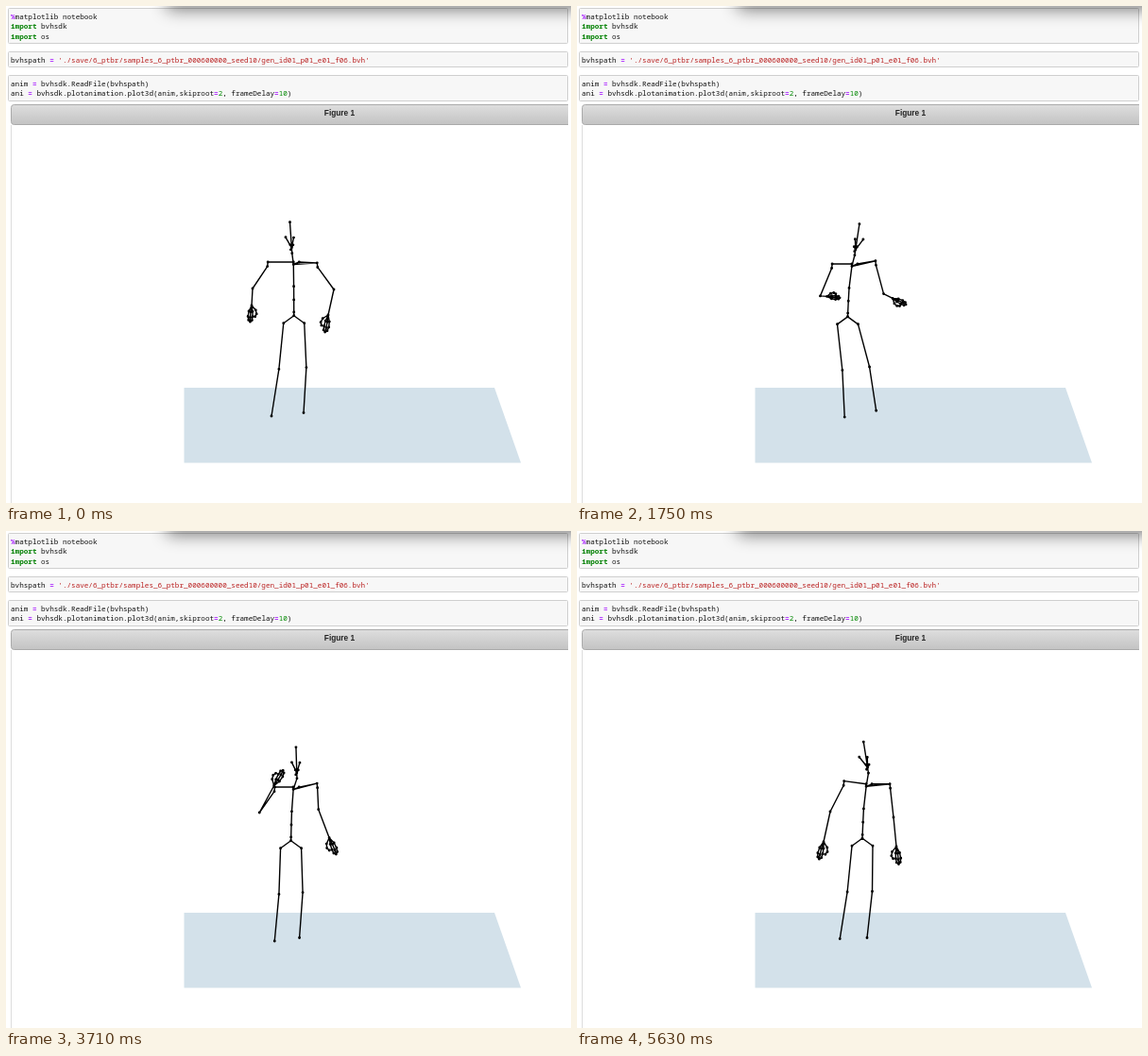
These frames come from a looping animation (598 px wide and 526 px high, 5680 ms). An HTML page:

```html
<!DOCTYPE html>
<html lang="en">
<head>
<meta charset="utf-8">
<title>Skeleton animation</title>
<style>
  html, body { margin: 0; height: 100%; overflow: hidden; background: #fff; }
  svg { display: block; width: 100vw; height: 100vh; }
  .cell { fill: #f7f7f7; stroke: #cfcfcf; }
  .code text { font: 7.63px "Noto Sans Mono", "DejaVu Sans Mono", monospace; white-space: pre; fill: #111; }
  .code .op { fill: #a2f; font-weight: bold; }
  .code .kw { fill: #008000; font-weight: bold; }
  .code .num { fill: #080; }
  .code .str { fill: #ba2121; }
  .title { font: bold 8.3px "Liberation Sans", Arial, sans-serif; fill: #222; }
  #bones, #joints { fill: none; stroke: #000; stroke-linecap: round; stroke-linejoin: round; }
  #bones { stroke-width: 1.4; }
  #joints { stroke-width: 2.9; }
</style>
</head>
<body>
<svg viewBox="0 0 598 526">
  <defs>
    <linearGradient id="bar" x2="0" y2="1">
      <stop stop-color="#dedede"/><stop offset="1" stop-color="#c3c3c3"/>
    </linearGradient>
    <filter id="soft" x="-10%" y="-200%" width="120%" height="500%"><feGaussianBlur stdDeviation="9"/></filter>
  </defs>
  <rect class="cell" x="2.5" y="2.5" width="592" height="37" rx="1"/>
  <rect class="cell" x="2.5" y="48.5" width="592" height="16" rx="1"/>
  <rect class="cell" x="2.5" y="73.5" width="592" height="27" rx="1"/>
  <rect x="170" y="-30" width="470" height="34" rx="4" opacity=".5" filter="url(#soft)"/>
  <g class="code">
    <text x="5" y="14"><tspan class="op">%</tspan>matplotlib notebook</text>
    <text x="5" y="24.4"><tspan class="kw">import</tspan> bvhsdk</text>
    <text x="5" y="34.7"><tspan class="kw">import</tspan> os</text>
    <text x="5" y="59.6">bvhspath <tspan class="op">=</tspan> <tspan class="str">'./save/6_ptbr/samples_6_ptbr_000600000_seed10/gen_id01_p01_e01_f06.bvh'</tspan></text>
    <text x="5" y="84.8">anim <tspan class="op">=</tspan> bvhsdk.ReadFile(bvhspath)</text>
    <text x="5" y="95.2">ani <tspan class="op">=</tspan> bvhsdk.plotanimation.plot3d(anim,skiproot<tspan class="op">=</tspan><tspan class="num">2</tspan>, frameDelay<tspan class="op">=</tspan><tspan class="num">10</tspan>)</text>
  </g>
  <path d="M595 104.5H8.5q-3 0-3 3V122.500q0 3 3 3H595" fill="url(#bar)" stroke="#aaa"/>
  <text class="title" x="353" y="116" text-anchor="middle">Figure 1</text>
  <path d="M5.500 126V526" stroke="#ddd"/>
  <path d="M188.500 404H517L545 483.500H188.500Z" fill="#d3e1ea"/>
  <path id="bones"/>
  <path id="joints"/>
</svg>
<script>
const FPS = 24, LOOP = 5680;

// Gesture times, with the elbow and wrist of each arm as [x, y, x, y].
const times = [0, 30, 55, 77, 102, 118, 135];
const leftArm = [
  [261,299, 260,317], [257,305, 259,290], [258,309, 271,327], [264,298, 279,270],
  [273,298, 289,269], [264,302, 277,326], [268,297, 261,329]];
const rightArm = [
  [347,300, 341,327], [333,306, 344,293], [315,303, 323,328], [334,297, 344,328],
  [327,292, 340,321], [329,294, 339,326], [335,303, 338,334]];

const mix = (a, b, u) => a + (b - a) * u;
const between = (p, q, u) => [mix(p[0], q[0], u), mix(p[1], q[1], u)];
const shift = (p, dx, dy) => [p[0] + dx, p[1] + dy];
const bump = (n, center, width) => Math.exp(-(((n - center) / width) ** 2) / 2);
function ramp(n, from, to) {
  const u = Math.min(1, Math.max(0, (n - from) / (to - from)));
  return u * u * (3 - 2 * u);
}

function gesture(keys, n) {
  let i = 0;
  while (i < times.length - 2 && n >= times[i + 1]) i++;
  const u = ramp(n, times[i], times[i + 1]);
  const [ex, ey, wx, wy] = keys[i].map((v, k) => mix(v, keys[i + 1][k], u));
  return [[ex, ey], [wx, wy]];
}

// Fingers fan out along the forearm, thumb first on the inner side.
function hand(elbow, wrist, side) {
  const dx = wrist[0] - elbow[0], dy = wrist[1] - elbow[1];
  const scale = 1 / (Math.hypot(dx, dy) + 4);
  const ux = dx * scale, uy = dy * scale;
  return [0, 1, 2, 3].map(i => {
    const reach = i ? 21 - 2 * Math.abs(i - 2) : 14;
    const spread = side * (i ? 5 - 3 * i : 7);
    const chain = [.4, .75, 1].map(u => {
      const along = reach * u, across = spread * Math.sin(2.3 * u);
      return shift(wrist, ux * along + uy * across, uy * along - ux * across);
    });
    return [wrist, ...chain];
  });
}

function arm(chest, collar, shoulder, keys, n, side) {
  const [elbow, wrist] = gesture(keys, n);
  const upper = shift(shoulder, -side * .5, 4.6);
  return [[chest, collar, shoulder, upper, elbow, wrist], ...hand(elbow, wrist, side)];
}

function leg(pelvis, foot, side, bend) {
  const hip = shift(pelvis, 11 * side, 8);
  return [pelvis, hip, shift(between(hip, foot, .5), bend, -.5), foot];
}

function skeleton(n) {
  const sway = bump(n, 46, 16);
  const dip = bump(n, 55, 12);
  const lift = 4 * ramp(n, 102, 135);
  const lean = 4 - 5.5 * Math.exp(-n / 25);

  const pelvis = [302 - 16 * sway + 3 * bump(n, 0, 12), 327.7 + 2 * dip - .6 * lift];
  const chest = [304.5 - 14 * sway + .4 * lift, 273.5 + 3.5 * dip - .8 * lift];
  const neck = shift(chest, lean - .4 * lift, -11.7 - .6 * lift);
  const tilt = .4 * (299 - pelvis[0]) - lift;
  const top = shift(neck, tilt, -33);
  const base = between(neck, top, .18);
  const ear = shift(neck, tilt - 4.5, -17);
  const spine = [.43, .69, .93].map(u =>
    [mix(chest[0], pelvis[0], Math.sqrt(u)), mix(chest[1], pelvis[1], u)]);

  const leftShoulder = shift(chest, -25 + 1.4 * lean - lift, -2.5 - .8 * lift);
  const rightShoulder = shift(chest, 25, -3 - .9 * lean + lift);
  const leftFoot = [281 + 4 * dip + 8 * bump(n, 108, 14) - lift, 434 + 2 * dip - .6 * lift];
  const rightFoot = [315 + 3 * dip - 8 * ramp(n, 55, 118), 430.5 - 4 * dip];

  return [
    [top, base, neck, chest, ...spine, pelvis],
    [ear, base, shift(ear, 8.5, .3)],
    [shift(base, -1.5, -3), base, shift(base, 1.5, -3)],
    [shift(base, -1, 2), base],
    [chest, rightShoulder],
    ...arm(chest, shift(chest, 0, -2.5), leftShoulder, leftArm, n, 1),
    ...arm(chest, shift(chest, 6, -2.5), rightShoulder, rightArm, n, -1),
    leg(pelvis, leftFoot, -1, 1.5),
    leg(pelvis, rightFoot, 1, 2.5)
  ];
}

const bones = document.getElementById("bones"), joints = document.getElementById("joints");

function draw(now) {
  const n = Math.floor((now % LOOP + 5) * FPS / 1000);
  const chains = skeleton(Math.min(n, 135));
  bones.setAttribute("d", chains.map(c => "M" + c.join("L")).join(""));
  joints.setAttribute("d", chains.flat().map(p => `M${p}h0`).join(""));
}

const start = performance.now();
function tick() {
  draw(performance.now() - start);
  requestAnimationFrame(tick);
}
tick();
</script>
</body>
</html>
```
